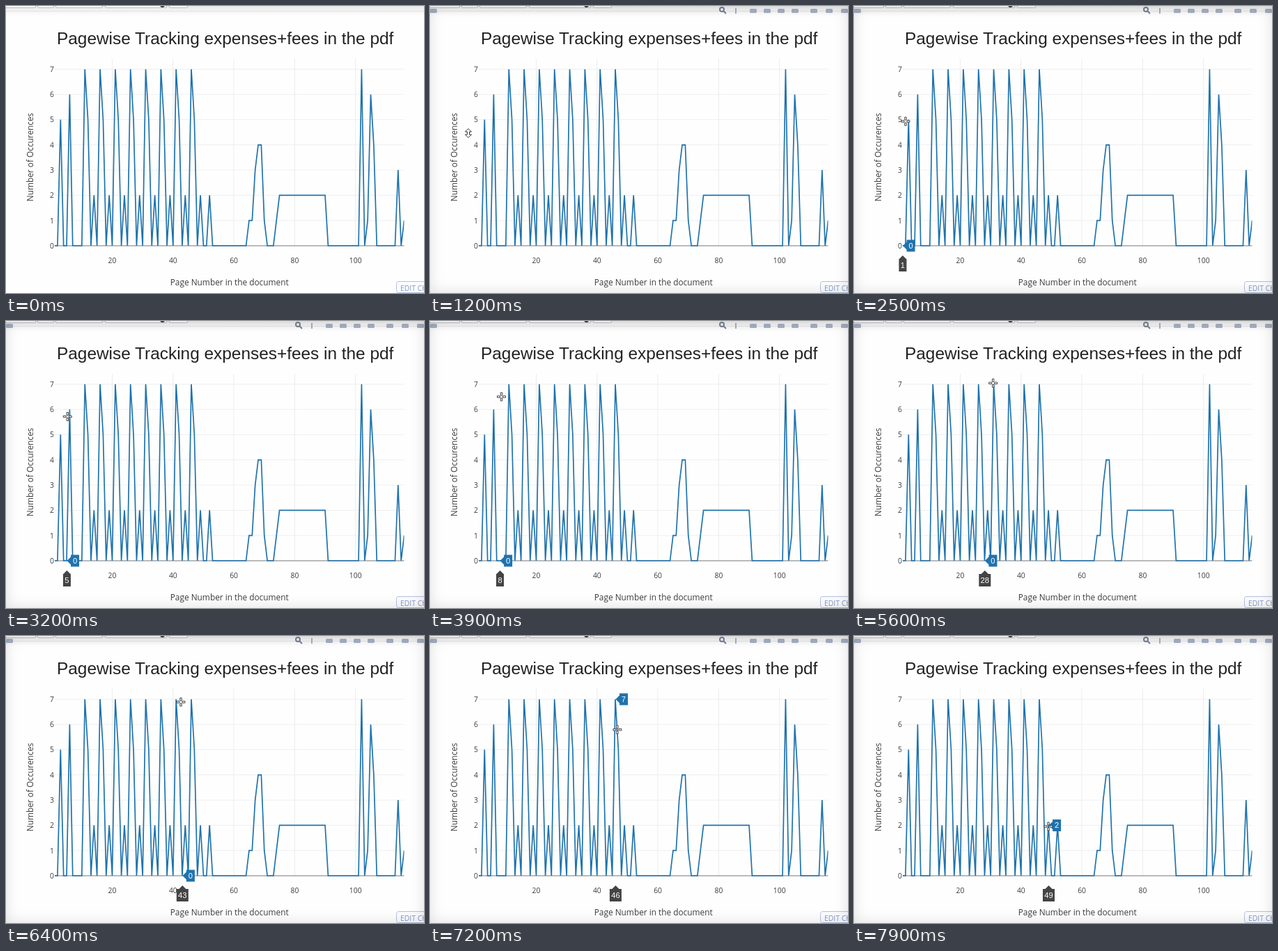
Write an HTML page that moves like this. It is 600x413 px and loops after 8000 ms.

```html
<!DOCTYPE html>
<html lang="en">
<head>
<meta charset="utf-8">
<title>Pagewise tracking chart</title>
<style>
html, body { margin: 0; width: 100%; height: 100%; overflow: hidden; background: #fefefe; }
svg { position: absolute; left: 0; top: 0; }
text { font-family: "Open Sans", sans-serif; fill: #3c3c3c; }
.tick { font-size: 10.3px; }
.axis { font-size: 11.85px; text-anchor: middle; }
.sans { font-family: "Liberation Sans", Arial, sans-serif; text-anchor: middle; }
.title { font-size: 24.4px; fill: #222; }
.tip { font-size: 11.2px; fill: #fff; }
.button { font-size: 10.4px; fill: #8498c1; }
#shade { position: absolute; width: 600px; height: 413px; box-shadow: inset 0 0 20px rgba(0, 0, 0, .13); }
</style>
</head>
<body>
<svg width="600" height="413" viewBox="0 0 600 413">
  <defs>
    <linearGradient id="fade" x2="0" y2="1">
      <stop stop-color="#e9e9ea"/><stop offset="1" stop-color="#fefefe"/>
    </linearGradient>
    <clipPath id="plot"><path d="M70 76H571.5V347H70z"/></clipPath>
  </defs>
  <rect width="600" height="14" fill="url(#fade)"/>
  <path d="M0 7.5H600" stroke="#e2e2e4"/>
  <g id="toolbar" fill="#fafafa" stroke="#bcbcc2"></g>
  <path d="M221 0h7l-2 2h-3z" fill="#444"/>
  <g id="modebar" fill="#a3adc0"></g>
  <g id="chart"></g>
  <rect x="560.5" y="396.5" width="70" height="16" rx="3" fill="#fbfcff" stroke="#b4c0da"/>
  <text class="button" x="566" y="410">EDIT CHART</text>
  <g id="hover"></g>
  <g id="cursor" fill="#fff" stroke="#333" stroke-linejoin="round">
    <path id="resize" d="M0-6.5L4.5-2H1.5V2H4.5L0 6.5L-4.5 2H-1.5V-2H-4.5z"/>
    <path id="cross" stroke-width=".9" d="M-1.2-6h2.4v4h-2.4zM-1.2 2h2.4v4h-2.4zM-6-1.2h4v2.4h-4zM2-1.2h4v2.4h-4z"/>
  </g>
</svg>
<div id="shade"></div>
<script>
const LOOP = 8000, STEP = 100, HOVER_LAG = 120;
const X0 = 65.2, PAGE_WIDTH = 4.365, PAGES = 116;
const $ = id => document.getElementById(id);
const px = page => X0 + page * PAGE_WIDTH;
const py = count => 345 - count * 36.29;
const repeat = (n, make) => Array.from({ length: n }, (_, i) => make(i)).join('');

// Page counts; index 0 is unused
const counts = Array(PAGES + 1).fill(0);
const put = (start, ...values) => values.forEach((v, i) => counts[start + i] = v);
put(3, 5, 0, 0, 6);
for (let p = 11; p <= 46; p += 5) put(p, 7, 5, 0, 2);
put(52, 2);
put(65, 1, 1, 3, 4, 4, 1);
put(74, 1);
counts.fill(2, 75, 91);
put(102, 7, 0, 1, 6, 4);
put(114, 3, 0, 1);

function drawChart() {
  const columns = repeat(5, i => {
    const page = 20 * (i + 1);
    return `<path d="M${px(page)} 76V345" stroke="#ececec"/>
      <text class="tick" text-anchor="middle" x="${px(page)}" y="370">${page}</text>`;
  });
  const rows = repeat(8, c => `<path d="M70 ${py(c)}H571.5" stroke="${c ? '#efefef' : '#777'}"/>
    <text class="tick" text-anchor="end" x="69" y="${py(c) + 3.8}">${c}</text>`);
  const points = counts.slice(1).map((c, i) => `${px(i + 1)},${py(c)}`).join(' ');
  $('chart').innerHTML = columns + rows + `
    <polyline points="${points}" clip-path="url(#plot)" fill="none" stroke="#1f73ae" stroke-width="1.7"/>
    <text class="sans title" x="314.7" y="54.6">Pagewise Tracking expenses+fees in the pdf</text>
    <text class="axis" x="320.7" y="402">Page Number in the document</text>
    <text class="axis" transform="translate(39 217.5) rotate(-90)">Number of Occurences</text>`;
}

function drawToolbars() {
  const button = (left, right) =>
    `<rect x="${left + .5}" y="-5.5" width="${right - left}" height="8" rx="1.5"/>`;
  $('toolbar').innerHTML = button(-5, 42) + button(45, 68) + button(71, 138) + button(142, 230) + button(234, 260);

  const icons = (x, n, gap) => repeat(n, i => `<rect x="${x + i * gap - 5}" y="4" width="10" height="6" rx="1.5"/>`);
  $('modebar').innerHTML = icons(393, 1) + icons(464, 4, 20) + icons(551, 3, 22) +
    '<path d="M438 3h2v8h-2z"/><path d="M421 7l4 4" stroke="#737d90" stroke-width="2"/>' +
    '<circle cx="419" cy="5" r="3" fill="none" stroke="#737d90" stroke-width="2"/>';
}

// Where the pointer turns or changes pace: [time, x, y]
const route = [
  [1200, 55, 183], [1900, 70, 163], [2400, 70, 163], [2500, 74, 166], [3900, 102.5, 109], [4800, 142, 84],
  [5500, 188, 89], [6100, 258, 91], [6400, 251, 95], [7000, 266, 95], [7900, 279, 274]
];

function pointer(t) {
  const i = Math.max(1, route.findIndex(stop => stop[0] >= t));
  const [t0, x0, y0] = route[i - 1], [t1, x1, y1] = route[i];
  const u = Math.max(0, (t - t0) / (t1 - t0));
  return [x0 + (x1 - x0) * u, y0 + (y1 - y0) * u];
}

function hoverTags(page) {
  const x = px(page), y = py(counts[page]);
  const half = page < 10 ? 5.5 : 8.5;
  return `<path fill="#1f73ae" d="M${x + .5} ${y}l5.5-5.5v-3h12v17h-12v-3z"/>
    <path fill="#444" d="M${x + .4} 359l5 5h${half - 5}v18h${-2 * half}v-18h${half - 5}z"/>
    <text class="sans tip" x="${x + 12}" y="${y + 4}">${counts[page]}</text>
    <text class="sans tip" x="${x + .4}" y="376.5">${page}</text>`;
}

function draw(now) {
  const t = Math.floor(now % LOOP / STEP) * STEP;
  const reveal = Math.min(1, t / 900);
  $('shade').style.opacity = reveal;
  $('modebar').setAttribute('opacity', reveal);

  const [x, y] = pointer(t);
  const inPlot = x > 69;
  $('cursor').setAttribute('transform', `translate(${x} ${y})`);
  $('cursor').style.display = reveal < 1 ? 'none' : '';
  $('resize').style.display = inPlot ? 'none' : '';
  $('cross').style.display = inPlot ? '' : 'none';

  // Tags trail slightly behind the pointer
  const page = Math.round((pointer(t - HOVER_LAG)[0] - X0) / PAGE_WIDTH);
  $('hover').innerHTML = t < 2000 ? '' : hoverTags(page);
}

drawChart();
drawToolbars();
const start = performance.now();
(function tick() {
  draw(performance.now() - start);
  requestAnimationFrame(tick);
})();
</script>
</body>
</html>
```
